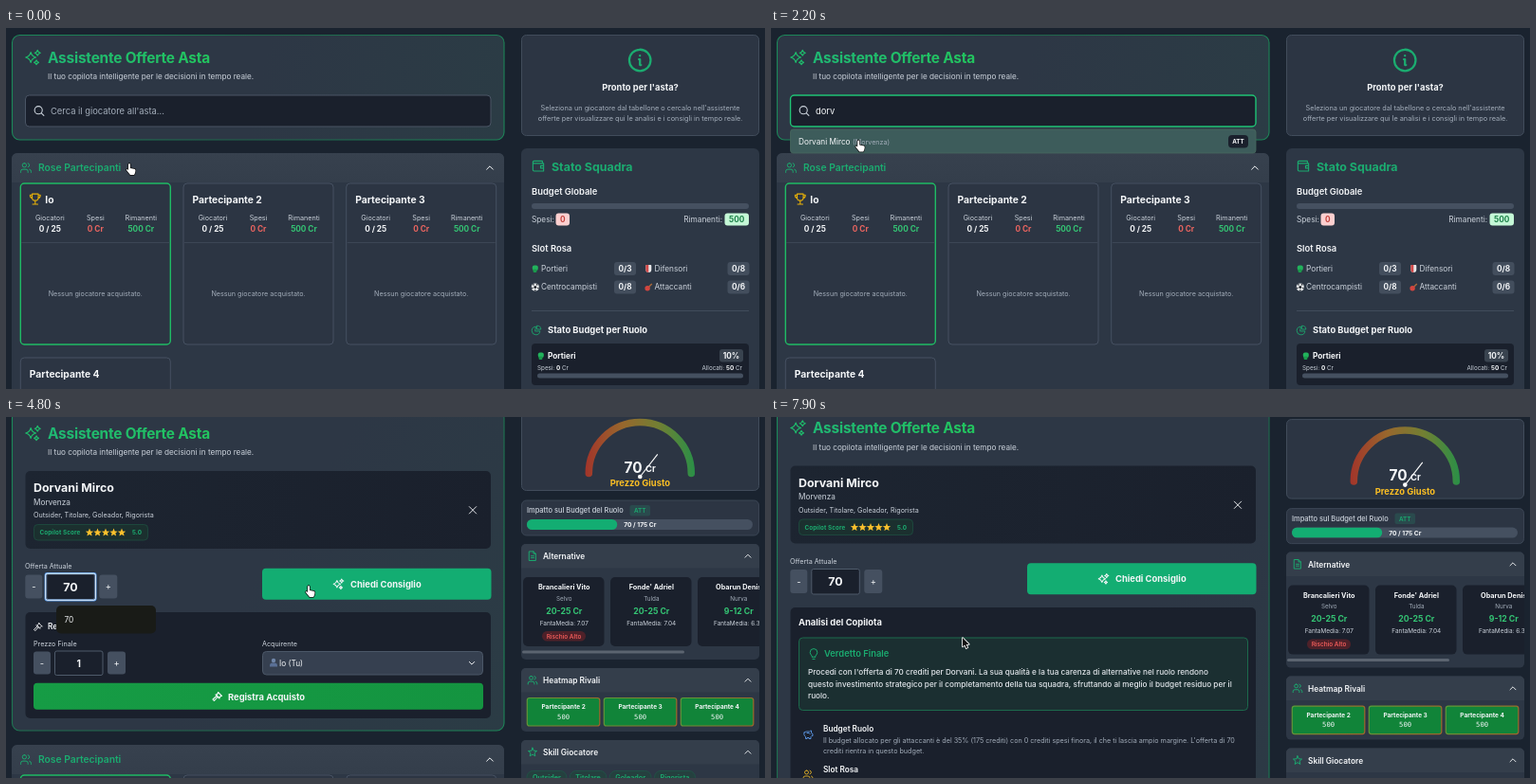
Write an HTML page with a canvas that moves like this. It is 800 px wide and 381 px high and loops after 8000 ms.

```html
<!DOCTYPE html>
<html lang="it">
<head>
<meta charset="utf-8">
<title>Assistente Offerte Asta</title>
<style>
html, body { margin: 0; width: 100%; height: 100%; overflow: hidden; background: #1a232f; }
canvas { display: block; width: 800px; height: 381px; }
</style>
</head>
<body>
<canvas id="stage"></canvas>
<script>
const W = 800, H = 381, LOOP = 8000;
const cv = document.getElementById('stage');
const dpr = window.devicePixelRatio || 1;
cv.width = W * dpr;
cv.height = H * dpr;
const c = cv.getContext('2d');

const XS = 6.3, SM = 7.2, MD = 8.24, LG = 9.38, XL = 10.3, X2 = 12.4, X3 = 15.4;
const PAGE = '#1a232f', CARD = '#2d3745', DARK = '#1a202c', LINE = '#414c5b', GREY = '#455060';
const WHITE = '#f4f6f8', SOFT = '#cbd2db', MUTED = '#a3adba';
const GREEN = '#1bac70', LIME = '#34c574', RED = '#ec6560';

// Timing
const SELECT = 2400, FOCUS = 3000, SEVEN = 4000, SEVENTY = 4200, ASK = 5000, ANSWER = 6600;
const PLAYER = 'Dorvani Mirco', TEAM = 'Morvenza', QUERY = 'dorv';

const star4 = (x, y, r) => {
  const k = r * 0.2;
  return `M${x} ${y - r}Q${x + k} ${y - k} ${x + r} ${y}Q${x + k} ${y + k} ${x} ${y + r}` +
    `Q${x - k} ${y + k} ${x - r} ${y}Q${x - k} ${y - k} ${x} ${y - r}Z`;
};
const star5 = (x, y, r) => {
  let d = '';
  for (let i = 0; i < 10; i++) {
    const a = -Math.PI / 2 + i * Math.PI / 5, q = i % 2 ? r * 0.45 : r;
    d += (i ? 'L' : 'M') + (x + q * Math.cos(a)) + ' ' + (y + q * Math.sin(a));
  }
  return d + 'Z';
};
const icons = {
  sparkles: star4(9, 12, 6.75) + star4(18, 6, 3.75) + star4(16.5, 18.75, 3),
  search: 'M21 21l-5.2-5.2M10.5 3a7.5 7.5 0 1 0 0 15 7.5 7.5 0 0 0 0-15',
  users: 'M9 3a4 4 0 1 0 0 8 4 4 0 0 0 0-8M2 21v-2a4 4 0 0 1 4-4h6a4 4 0 0 1 4 4v2M16 3.2a4 4 0 0 1 0 7.6M22 21v-2a4 4 0 0 0-3-3.9',
  up: 'M4 16l8-8 8 8',
  down: 'M4 8l8 8 8-8',
  info: 'M12 2a10 10 0 1 0 0 20 10 10 0 0 0 0-20M11 11.2h1v5.3h1M12 7.6v.2',
  wallet: 'M3 5v13a2 2 0 0 0 2 2h16V7H5a2 2 0 0 1 0-4h14v4M21 11h-5v4h5',
  pie: 'M10 4a9 9 0 1 0 10 10H10zM14 2a8 8 0 0 1 8 8h-8z',
  trophy: 'M7 22h10M12 15v7M6 2h12v7a6 6 0 0 1-12 0zM6 4H2c0 4 1 6 4 6M18 4h4c0 4-1 6-4 6',
  gavel: 'M13 12l-8 9-3-3 9-8M8 8l8 8M13 3l8 8M9 9l5-5M15 15l5-5',
  doc: 'M5 2h9l5 5v15H5zM14 2v5h5M9 12h6M9 16h6',
  star: star5(12, 12.5, 10),
  bulb: 'M9 18h6M10 22h4M9 18c0-4-4-4-4-9a7 7 0 0 1 14 0c0 5-4 5-4 9',
  piggy: 'M4 8c2-1 3-2 5-2h6c2-2 3-2 4-2v4l2 3h1v4h-2l-2 2v4h-4v-2h-4v2H7v-4c-3-2-4-5-3-9M10 9h4M16 11v.2',
  close: 'M4 4l16 16M20 4L4 20'
};
for (const k in icons) icons[k] = new Path2D(icons[k]);

const clamp = (v, a = 0, b = 1) => Math.min(b, Math.max(a, v));
const ease = p => p * p * (3 - 2 * p);
const ramp = (t, a, b) => ease(clamp((t - a) / (b - a)));

function text(s, x, y, size, weight = 400, color = WHITE, align = 'left', family = 'Inter, sans-serif', track = 0) {
  c.font = `${weight} ${size}px ${family}`;
  c.letterSpacing = track + 'px';
  c.textAlign = align;
  c.fillStyle = color;
  c.fillText(s, x, y + size * 0.36);
}
function box(x0, y0, x1, y1, r, fill, stroke, lw = 1) {
  c.beginPath();
  c.roundRect(x0, y0, x1 - x0, y1 - y0, r);
  if (fill) { c.fillStyle = fill; c.fill(); }
  if (stroke) { c.strokeStyle = stroke; c.lineWidth = lw; c.stroke(); }
}
function line(x0, y0, x1, y1, color, lw = 1) {
  c.beginPath();
  c.moveTo(x0, y0);
  c.lineTo(x1, y1);
  c.strokeStyle = color;
  c.lineWidth = lw;
  c.stroke();
}
function dot(x, y, r, color) {
  c.beginPath();
  c.arc(x, y, r, 0, 7);
  c.fillStyle = color;
  c.fill();
}
function icon(name, x, y, size, color, lw = 1.8) {
  c.save();
  c.translate(x - size / 2, y - size / 2);
  c.scale(size / 24, size / 24);
  c.lineWidth = lw;
  c.lineCap = c.lineJoin = 'round';
  c.strokeStyle = color;
  c.stroke(icons[name]);
  c.restore();
}
function shift(dy, draw) {
  c.save();
  c.translate(0, dy);
  draw();
  c.restore();
}
function grad(x0, y0, x1, y1, ...stops) {
  const g = c.createLinearGradient(x0, y0, x1, y1);
  stops.forEach((s, i) => g.addColorStop(i / (stops.length - 1), s));
  return g;
}

function mainCard(bottom) {
  box(6.5, 7.5, 525, bottom, 8, grad(6, 7, 525, bottom, CARD, '#2d3745', '#2b3c45'),
    grad(6, 7, 525, bottom, '#1b8a5a', '#20644b', '#1c8557'), 1.1);
  icon('sparkles', 28.5, 31, 19, '#1fbd6c', 1.6);
  text('Assistente Offerte Asta', 44, 31, X3, 700, grad(44, 0, 215, 0, '#1fb873', '#22c55e'), 'left', undefined, -0.2);
  text('Il tuo copilota intelligente per le decisioni in tempo reale.', 44, 51.5, 8.2, 400, SOFT);
}

function rosterCard(x, y, name, mine) {
  box(x, y, x + 158, y + 170, 4, '#2c3543', mine ? '#1fbb64' : '#465162', mine ? 1.4 : 1);
  line(x + 1, y + 62.5, x + 157, y + 62.5, '#3c4655');
  if (mine) icon('trophy', x + 15.5, y + 16.5, 13, '#eab308', 2);
  text(name, x + (mine ? 26 : 9.5), y + 17, XL, 700);
  const cols = [['Giocatori', '0 / 25', WHITE], ['Spesi', '0 Cr', RED], ['Rimanenti', '500 Cr', LIME]];
  cols.forEach(([label, value, color], i) => {
    const cx = x + 31 + i * 48;
    text(label, cx, y + 36, SM, 400, SOFT, 'center');
    text(value, cx, y + 48, MD, 700, color, 'center');
  });
  text('Nessun giocatore acquistato.', x + 79, y + 116.5, SM, 400, MUTED, 'center');
}
function rosters() {
  box(6, 132, 525, 560, 6, CARD);
  box(6, 132, 525, 163, [6, 6, 0, 0], grad(0, 132, 0, 163, '#37414e', '#343e4b'));
  icon('users', 21, 147.5, 13, GREEN);
  text('Rose Partecipanti', 34, 147.5, XL, 600, GREEN);
  icon('up', 510, 147.5, 10, WHITE, 2.4);
  rosterCard(15.3, 164, 'Io', true);
  rosterCard(187, 164, 'Partecipante 2');
  rosterCard(358.7, 164, 'Partecipante 3');
  rosterCard(15.3, 348, 'Partecipante 4');
}

function searchBox(t) {
  const active = t >= 1000;
  const typed = QUERY.slice(0, clamp(Math.floor((t - 1200) / 150), 0, 4));
  box(20.5, 71, 511, 104, 4, DARK, active ? '#1fc274' : '#4a5565', active ? 1.4 : 1);
  icon('search', 35, 87.5, 13, SOFT, 2);
  if (typed) text(typed, 47, 87.5, LG, 400, WHITE);
  else text("Cerca il giocatore all'asta...", 47, 87.5, LG, 400, MUTED);
  if (typed.length > 1) {
    box(20.5, 107, 511, 132, 3, t >= 1800 ? '#3d5c5b' : CARD, '#48695f', 0.8);
    text(PLAYER, 29, 120, MD, 400, WHITE);
    const w = c.measureText(PLAYER).width;
    text(`(${TEAM})`, 31.5 + w, 120.3, SM, 400, MUTED);
    box(482, 113, 503, 126.5, 4, DARK);
    text('ATT', 492.5, 120, XS, 700, WHITE, 'center');
  }
}

function roleIcon(kind, x, y) {
  if (kind === 0) {
    box(x - 3, y - 3.5, x + 3, y + 2, 2, '#22b35c');
    box(x - 2.2, y + 0.5, x + 1.6, y + 4, 1, '#1a9a4c');
  } else if (kind === 1) {
    box(x - 3, y - 4, x + 3, y + 4, [1, 1, 3, 3], '#e8e8ea');
    box(x - 3, y - 4, x, y + 4, [1, 0, 0, 3], '#d04848');
  } else if (kind === 2) {
    dot(x, y, 4, '#eceff1');
    dot(x, y, 1.5, '#20252c');
    for (let i = 0; i < 5; i++) dot(x + 3.2 * Math.sin(i * 1.257), y + 3.2 * Math.cos(i * 1.257), 0.8, '#20252c');
  } else {
    line(x - 1, y + 1, x + 3.5, y - 3.5, '#a8683a', 1.5);
    dot(x - 1.2, y + 1.2, 2.7, '#d2453f');
  }
}

function sideIdle() {
  box(543.5, 7.5, 793.5, 113.5, 5, '#2c3543', LINE);
  icon('info', 668.2, 34, 27, GREEN, 2);
  text("Pronto per l'asta?", 668.5, 62.5, LG, 700, WHITE, 'center');
  text("Seleziona un giocatore dal tabellone o cercalo nell'assistente", 668.5, 84, 7.3, 400, MUTED, 'center');
  text('offerte per visualizzare qui le analisi e i consigli in tempo reale.', 668.5, 95, 7.3, 400, MUTED, 'center');

  box(543, 127, 794, 420, 6, CARD);
  icon('wallet', 561, 146, 15, GREEN);
  text('Stato Squadra', 575, 146.5, X2, 700, GREEN);
  text('Budget Globale', 554, 173, LG, 600);
  box(554, 185, 783, 191, 3, GREY);
  text('Spesi:', 554, 202, MD, 400, SOFT);
  box(579.5, 195.5, 594, 208.5, 3, '#fccfcf');
  text('0', 586.7, 202, MD, 700, '#c2413c', 'center');
  text('Rimanenti:', 755, 202, MD, 400, SOFT, 'right');
  box(757.5, 195.5, 783, 208.5, 3, '#c4f7d6');
  text('500', 770.2, 202, MD, 700, '#1c8048', 'center');
  text('Slot Rosa', 554, 233, LG, 600);
  [['Portieri', '0/3'], ['Difensori', '0/8'], ['Centrocampisti', '0/8'], ['Attaccanti', '0/6']].forEach(([role, n], i) => {
    const x = i % 2 ? 119.5 : 0, y = i < 2 ? 254 : 273.5;
    roleIcon(i, 557.8 + x, y);
    text(role, 564 + x, y, MD, 400, SOFT);
    box(641 + x, y - 7, 664 + x, y + 7, 3, '#434e5d');
    text(n, 652.5 + x, y, MD, 700, WHITE, 'center');
  });
  line(554, 298.5, 783, 298.5, LINE);
  icon('pie', 559, 319, 11.5, GREEN);
  text('Stato Budget per Ruolo', 571, 319, LG, 700);
  box(554, 333, 783, 377, 4, DARK);
  roleIcon(0, 563.8, 346);
  text('Portieri', 571, 346, MD, 700);
  box(752, 339, 777, 352.5, 3, '#39434f');
  text('10%', 764.5, 346, MD, 700, WHITE, 'center');
  labelled('Spesi: ', '0', ' Cr', 560);
  labelled('Allocati: ', '50', ' Cr', 733.5);
  box(560, 364.5, 777, 369.5, 2.5, GREY);
}
function labelled(a, b, d, x) {
  [[a, 400], [b, 700], [d, 400]].forEach(([s, w]) => {
    text(s, x, 358.5, XS, w, w > 400 ? WHITE : SOFT);
    x += c.measureText(s).width;
  });
}

function stepper(x, y, h, value, size, focus) {
  box(x, y, x + 18, y + h, 3, GREY);
  text('-', x + 9, y + h / 2, LG, 400, WHITE, 'center');
  box(x + 78, y, x + 97, y + h, 3, GREY);
  text('+', x + 87.5, y + h / 2, LG, 400, WHITE, 'center');
  box(x + 22.5, y - 0.5, x + 73, y + h + 1, 2, DARK, '#4f5b6b');
  if (focus) {
    box(x + 21.2, y - 1.5, x + 74.3, y + h + 2, 2, null, '#5b9bea', 1.8);
    box(x + 21.4, y - 1.3, x + 74.1, y + h + 1.8, 2, null, '#eef5fc', 0.9);
  }
  text(value, x + 47.7, y + h / 2 + 0.5, size, 700, WHITE, 'center');
}

function register() {
  box(20.5, 206, 511, 318, 5, DARK);
  icon('gavel', 34, 221.5, 11, WHITE, 2);
  text('Registra Esito Asta', 44, 221.5, MD, 600);
  text('Prezzo Finale', 29, 239.5, SM, 400, SOFT);
  text('Acquirente', 270, 239.5, SM, 400, SOFT);
  stepper(29, 247.5, 24, '1', XL);
  box(270.5, 247.5, 502.5, 272, 4, '#364050', '#4b5767');
  dot(282, 257, 2.2, '#6f86a8');
  box(278, 259.5, 286, 263.5, [3, 3, 0, 0], '#5a7096');
  text('Io (Tu)', 288, 259.8, MD);
  icon('down', 491, 259.8, 8, WHITE, 3);
  box(29, 280.7, 503, 308.7, 4, grad(29, 0, 503, 0, '#169c45', '#149440'));
  icon('gavel', 223, 295, 12, WHITE, 2.2);
  text('Registra Acquisto', 234, 295.2, LG, 700);
}

function skeleton(t) {
  const wave = 0.8 + 0.2 * Math.cos((t - 6200) * Math.PI / 1000);
  box(20.5, 205.5, 511, 302, 5, '#262e3b');
  c.globalAlpha = wave;
  box(29, 214, 187, 225, 2, '#3a4350');
  dot(39.5, 244, 10.5, '#3a4350');
  box(58, 233.5, 169.5, 242, 2, '#3a4350');
  box(58, 246.5, 503, 255, 2, '#3a4350');
  box(29, 263.5, 503, 293.5, 2, '#3a4350');
  c.globalAlpha = 1;
}

function answer() {
  box(20.5, 206.5, 511, 480, 5, DARK);
  text('Analisi del Copilota', 29, 222.5, LG, 700);
  box(29.5, 238.5, 502.5, 315, 4, '#1b2f31', '#1c6a4c');
  icon('bulb', 45, 255.5, 13, GREEN);
  text('Verdetto Finale', 56, 255.5, LG, 600, GREEN);
  [`Procedi con l'offerta di 70 crediti per ${PLAYER.split(' ')[0]}. La sua qualità e la tua carenza di alternative nel ruolo rendono`,
    'questo investimento strategico per il completamento della tua squadra, sfruttando al meglio il budget residuo per il',
    'ruolo.'].forEach((s, i) => text(s, 39, 274.3 + i * 12.8, 8.2, 500, '#e3e7ec'));
  icon('piggy', 39, 340.5, 12, '#5f9df0');
  text('Budget Ruolo', 55, 335, MD, 600);
  text("Il budget allocato per gli attaccanti è del 35% (175 crediti) con 0 crediti spesi finora, il che ti lascia ampio margine. L'offerta di 70", 55, 346.8, SM, 400, MUTED);
  text('crediti rientra in questo budget.', 55, 357.5, SM, 400, MUTED);
  icon('users', 39, 383, 12, '#e0b02a');
  text('Slot Rosa', 55, 378, MD, 600);
}

function spinner(x, y, t) {
  const turn = Math.floor(t / 100);
  c.lineCap = 'round';
  for (let i = 0; i < 8; i++) {
    const a = i * Math.PI / 4, k = (i - turn % 8 + 8) % 8;
    c.globalAlpha = 0.4 + k * 0.085;
    line(x + 3 * Math.cos(a), y + 3 * Math.sin(a), x + 5.6 * Math.cos(a), y + 5.6 * Math.sin(a), '#fff', 1.2);
  }
  c.globalAlpha = 1;
  c.lineCap = 'butt';
}

function player(t, value) {
  const loading = t >= ASK && t < ANSWER, done = t >= ANSWER;
  const push = loading ? 109 : done ? 300 : 0;
  shift(-14, () => mainCard(345 + push));
  box(20.5, 57, 511, 139, 5, grad(20, 57, 511, 139, '#1d2531', '#1a202c'));
  text(PLAYER, 29, 75, X2, 700);
  text(TEAM, 29, 89.8, MD, 400, SOFT);
  text('Outsider, Titolare, Goleador, Rigorista', 29, 103.5, SM, 400, SOFT);
  box(29.5, 113.5, 149.5, 130, 4, '#1b302f', '#1f4f41', 0.8);
  text('Copilot Score', 35.5, 121.8, XS, 700, GREEN, 'left', undefined, 0.12);
  c.fillStyle = '#fbc02d';
  for (let i = 0; i < 5; i++) c.fill(new Path2D(star5(88 + i * 8.5, 122, 4.4)));
  text('5.0', 133, 121.8, XS, 700, GREEN);
  icon('close', 492, 98.3, 11, WHITE, 2);

  text('Offerta Attuale', 20, 157.5, SM, 400, SOFT);
  stepper(20.3, 166.5, 25, String(value), X2, t >= FOCUS && t < ASK);
  if (loading) {
    box(270, 159.7, 511.5, 192.7, 4, '#646a75');
    spinner(368, 176.3, t);
    text('Analisi...', 380, 176.5, LG, 700);
    skeleton(t);
  } else {
    box(270, 159.7, 511.5, 192.7, 4, '#13ad72');
    icon('sparkles', 350.5, 176.3, 13, WHITE, 2);
    text('Chiedi Consiglio', 363, 176.5, LG, 700);
  }
  if (done) answer();
  else shift(push, register);
  shift(214 + push, rosters);
  if (t >= SEVENTY && t < ASK) {
    box(53, 199, 158, 228.5, 5, '#191b17');
    text('70', 61.5, 214, MD, 400);
  }
}

function sideHead(y0, y1, name, label) {
  box(543, y0, 794, y1, 5, CARD);
  box(543, y0, 794, y0 + 25.5, [5, 5, 0, 0], '#343e4b');
  icon(name, 555, y0 + 12.7, 11.5, GREEN, 2);
  text(label, 566, y0 + 12.9, 8.35, 600);
  icon('up', 782, y0 + 12.7, 9, WHITE, 2.4);
}

function gauge(value, level) {
  const cx = 668.3, cy = 63;
  box(543.5, -6, 793.5, 77.5, 5, '#2c3543', LINE);
  c.beginPath();
  c.arc(cx, cy - 3.5, 54, Math.PI, 0);
  c.lineWidth = 7.5;
  c.lineCap = 'round';
  c.strokeStyle = grad(611, 0, 726, 0, '#a2352a', '#98672d', '#727f33', '#2a8f47');
  c.stroke();
  c.lineCap = 'butt';
  c.font = `700 ${X3}px Inter, sans-serif`;
  c.letterSpacing = '0px';
  const w = c.measureText(value).width;
  const x = cx - (w + 14.5) / 2;
  text(String(value), x, 53, X3, 700);
  text('Cr', x + w + 3.5, 54.8, LG, 700);
  const a = level * 52 / 70 * Math.PI / 180;
  line(cx, cy, cx + 30 * Math.cos(a), cy - 30 * Math.sin(a), '#fff', 1.1);
  dot(cx, cy, 2.3, '#fff');
  if (value < 70) text('Ottimo Affare', cx, 69.7, LG, 700, '#22c55e', 'center');
  else text('Prezzo Giusto', cx, 69.7, LG, 700, '#fbbf24', 'center');
}

function sidePlayer(value, level) {
  gauge(value, level);
  box(543.5, 88, 793.5, 125, 5, '#2c3543', LINE, 0.8);
  text('Impatto sul Budget del Ruolo', 549, 98.5, 7.45, 500, SOFT);
  box(657.5, 93, 679, 104.5, 2, '#2a4a4d');
  text('ATT', 668.2, 98.8, XS, 600, GREEN, 'center');
  box(549, 108, 787, 119, 5.5, GREY);
  c.save();
  c.beginPath();
  c.roundRect(549, 108, 238, 11, 5.5);
  c.clip();
  box(549 - 12, 108, 549 + Math.max(1.6, 238 * level / 175), 119, 5.5, '#13ad72');
  c.restore();
  text(`${value} / 175 Cr`, 668.3, 113.7, 6.7, 700, WHITE, 'center');

  sideHead(134, 256, 'doc', 'Alternative');
  c.save();
  c.beginPath();
  c.rect(543, 134, 251, 122);
  c.clip();
  [['Brancalieri Vito', 'Selvo', '20-25', '7.07'], ["Fonde' Adriel", 'Tulda', '20-25', '7.04'], ['Obarun Denis', 'Nurva', '9-12', '6.38']]
    .forEach(([name, team, price, avg], i) => {
      const x = 545 + i * 92, m = x + 43.3;
      box(x, 169, x + 85.5, 242, 5, DARK);
      text(name, m, 179.7, 7.3, 700, WHITE, 'center');
      text(team, m, 191.6, XS, 400, MUTED, 'center');
      text(price + ' Cr', m, 204.7, 8.7, 700, LIME, 'center');
      text('FantaMedia: ' + avg, m, 217.3, 6.45, 400, SOFT, 'center');
    });
  box(565, 226, 611, 236.5, 5.2, '#4e2129');
  text('Rischio Alto', 588, 231.3, 6.4, 600, '#ea5a58', 'center');
  box(544, 246.5, 715, 249.5, 1.5, '#5b6470');
  c.restore();

  sideHead(265, 332, 'users', 'Heatmap Rivali');
  for (let i = 0; i < 3; i++) {
    const x = 549.3 + i * 81;
    box(x, 296.5, x + 76.5, 326, 2.5, '#118439', grad(x, 296, x + 76, 326, '#5c9a38', '#86802f', '#a0652b'), 1.2);
    text('Partecipante ' + (i + 2), x + 38.3, 306, 6.5, 700, WHITE, 'center');
    text('500', x + 38.3, 316, SM, 400, WHITE, 'center', '"DejaVu Sans Mono", monospace');
  }

  sideHead(341, 440, 'star', 'Skill Giocatore');
  let x = 549;
  for (const tag of ['Outsider', 'Titolare', 'Goleador', 'Rigorista']) {
    c.font = `600 ${SM}px Inter, sans-serif`;
    const w = c.measureText(tag).width + 12;
    box(x, 373.5, x + w, 387, 6.5, '#25403f', '#1f5a48', 0.7);
    text(tag, x + 6, 380.5, SM, 600, GREEN);
    x += w + 3.5;
  }
}

// time, x, y of the pointer tip
const track = [
  [0, 130, 143], [400, 130, 143], [900, 118, 88], [1500, 118, 88], [2000, 93, 114],
  [2300, 92, 120], [2700, 87, 182], [3000, 76, 181], [4400, 76, 181],
  [4800, 319, 178], [5100, 330, 177], [5700, 344, 173], [6800, 344, 173], [7500, 202, 233], [8000, 202, 233]
];
function pointerAt(t) {
  const i = track.findIndex((k, n) => n && t <= k[0]);
  const [t0, x0, y0] = track[i - 1], [t1, x1, y1] = track[i];
  const p = ramp(t, t0, t1);
  return [x0 + (x1 - x0) * p, y0 + (y1 - y0) * p];
}
function shape(d, fill, edge, lw) {
  const p = new Path2D(d);
  c.lineJoin = 'round';
  c.lineWidth = lw;
  c.strokeStyle = edge;
  c.stroke(p);
  c.fillStyle = fill;
  c.fill(p);
}
function pointer(t) {
  if (t >= 3300 && t < 4500) return;
  const [x, y] = pointerAt(t);
  const hand = t < 600 || (t >= 2100 && t < SELECT) || (t >= 4600 && t < ASK);
  const beam = (t >= 600 && t < 2100) || (t >= 2600 && t < 3300);
  c.save();
  c.translate(x, y);
  if (hand) {
    shape('M-1 1q1-2 2 0v4l5 1q1 1 0 4l-1 2h-4l-4-5q0-2 2 0z', '#fff', '#111', 1.4);
  } else if (beam) {
    const p = new Path2D('M-2.5-5.5Q0-5.5 0-4V4Q0 5.5-2.5 5.5M2.5-5.5Q0-5.5 0-4M0 4Q0 5.5 2.5 5.5M-1.5 1.5h3');
    c.lineWidth = 2.2;
    c.strokeStyle = '#111';
    c.stroke(p);
    c.lineWidth = 1;
    c.strokeStyle = '#fff';
    c.stroke(p);
  } else {
    shape('M0 0v9.5l2.2-2 1.6 3.6 1.5-.7-1.6-3.5h3z', '#111', '#fff', 1.6);
    if (t >= ASK && t < ANSWER) {
      dot(6, 15, 6, '#fff');
      dot(6, 15, 5.2, '#15181d');
      dot(6, 15, 3.7, '#fff');
      line(3, 12, 9, 18, '#15181d', 1.5);
    }
  }
  c.restore();
}

function draw(t) {
  c.setTransform(dpr, 0, 0, dpr, 0, 0);
  c.fillStyle = PAGE;
  c.fillRect(0, 0, W, H);
  if (t < SELECT) {
    mainCard(118);
    rosters();
    searchBox(t);
    sideIdle();
  } else {
    const value = t < SEVEN ? 1 : t < SEVENTY ? 7 : 70;
    const level = 1 + 6 * ramp(t, SEVEN - 100, SEVEN + 100) + 63 * ramp(t, SEVENTY - 100, SEVENTY + 300);
    const entry = 14 * (1 - ramp(t, SELECT, 2700)), scroll = ramp(t, 6800, 7200);
    shift(entry - 5.5 * scroll, () => player(t, value));
    shift(entry + 8.6 * scroll, () => sidePlayer(value, level));
  }
  pointer(t);
}

function tick() {
  const t = performance.now() % LOOP;
  draw(Math.floor(t / 100) * 100);
  requestAnimationFrame(tick);
}
tick();
</script>
</body>
</html>
```
